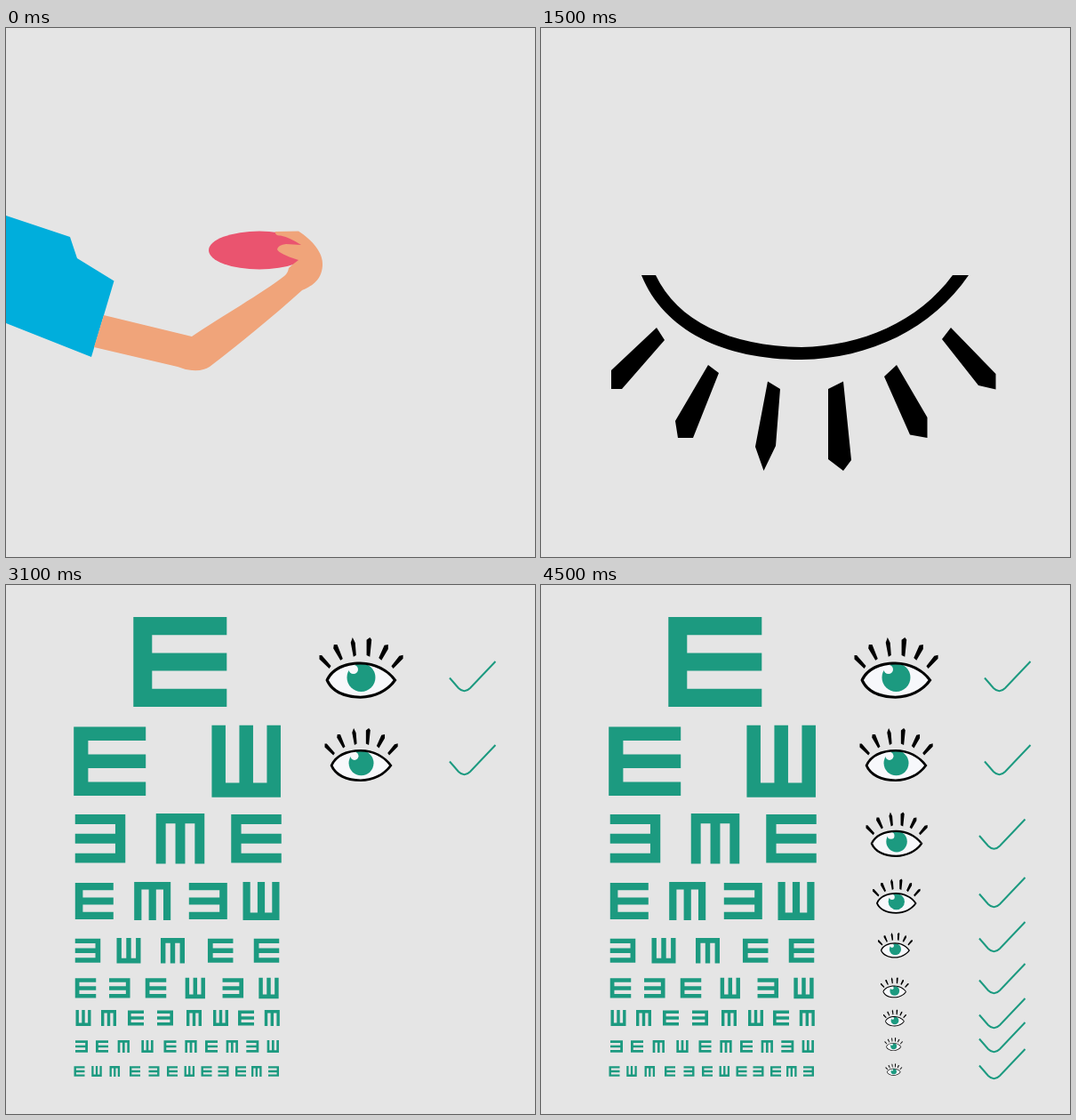
Animation of 595x595 px, one loop 5000 ms. Source, as an HTML page with a canvas:

```html
<!DOCTYPE html>
<html lang="en">
<head>
<meta charset="utf-8">
<title>Eye test</title>
<style>
  html, body { margin: 0; width: 100%; height: 100%; overflow: hidden; background: #e5e5e5; }
  canvas { display: block; }
</style>
</head>
<body>
<canvas id="stage" width="595" height="595"></canvas>
<script>
const ctx = document.getElementById('stage').getContext('2d');
const GREEN = '#1c9a80', BLUE = '#00aedc', SKIN = '#f0a47a', PINK = '#ea546f', WHITE = '#f7f8fb';
const LOOP = 5000;

const fill = (d, color) => {
  ctx.fillStyle = color;
  ctx.fill(new Path2D(d), 'evenodd');
};

const oval = (x, y, rx, ry, color) => {
  ctx.beginPath();
  ctx.ellipse(x, y, rx, ry, 0, 0, 2 * Math.PI);
  ctx.fillStyle = color;
  ctx.fill();
};

function line(d, color, width) {
  ctx.strokeStyle = color;
  ctx.lineWidth = width;
  ctx.stroke(new Path2D(d));
}

function holdDisc() {
  fill('M0 211L72 235L80 259L121.5 284.5L96 370L0 332Z', BLUE);
  oval(285, 250, 57, 21.5, PINK);
  fill('M110 323L209 347C240 326 290 297 313 279Q317 276 318 270Q322 266 329 261' +
    'Q307 254 305 249Q306 244 315 243L332 244Q320 236 309 233.5Q303 234 302.5 229' +
    'L329 228.5C345 239 357 253 356 267C355 285 342 291 333 295C300 325 260 357 229 381' +
    'Q222 386 209 385Q200 384 193 381L99 359Z', SKIN);
}

function throwDisc() {
  fill('M1 219.5L45 235L53 259L95 304L67.5 389.5L2 350L0 285V235Z', BLUE);
  fill('M89 323.5L176 370C220 378 275 388 308 390Q322 391 328 388C343 376 362 370 378 369.5' +
    'Q385 370 385 377Q384 384 377 384.5C368 384 355 384 355 400Q356 406 363 406.5' +
    'C382 408 402 429 408 443Q410 451 402 451Q396 450 378 443Q370 444 353 443' +
    'L316 421C270 414 205 404 176 404.5Q158 407 143 392L77 360Z', SKIN);
  line('M351 343.5C338 335 333 329 333 322C335 300 390 296 460 297.5H517', '#4d4d4d', 1);
}

// Lower half of the eye outline; the upper half is its mirror image.
const RIM = 'M113 278C138 340 205 373 293 373C370 372 440 338 481 278' +
  'H463C425 330 360 358 293 359C212 358 153 329 129 278Z';
const INNER = 'M121 278C146 335 209 365 293 366C365 365 433 334 472 278Z';
const LASHES = 'M130 337L139 351L91 406H79V385Z M188 379L200 388L171 461H154L151 442Z' +
  'M255 397.5L269 406L264 470L250.5 498L241 471Z M323 406L340 397.5L349 486L340 498L323 485Z' +
  'M386 392L400 379L434.5 438V461L415 457.5Z M451 350L461 337L511.5 389V406.5L492 402Z';

function flipped(draw, dx, axis) {
  ctx.save();
  ctx.translate(dx, 2 * axis);
  ctx.scale(1, -1);
  draw();
  ctx.restore();
}

function closedEye() {
  fill(RIM, '#000');
  fill(LASHES, '#000');
}

function openEye() {
  const white = new Path2D(INNER);
  white.addPath(new Path2D(INNER), new DOMMatrix([1, 0, 0, -1, 0, 556]));
  ctx.save();
  ctx.clip(white);
  ctx.fillStyle = WHITE;
  ctx.fillRect(100, 180, 400, 200);
  oval(297, 264, 73.5, 73.5, GREEN);
  oval(257, 222, 24, 24, WHITE);
  ctx.restore();
  fill(RIM, '#000');
  flipped(() => fill(RIM, '#000'), 0, 278);
  flipped(() => fill(LASHES, '#000'), 2, 277.4);
}

// Each chart row: letters, centre y, arm length, height, letter centres.
const ROWS = [
  ['E', 86.5, 105, 101, [195.8]],
  ['EW', 198.3, 81, 77.5, [116.7, 270.2]],
  ['3ME', 285.3, 56.5, 54.5, [106, 196, 281.5]],
  ['EM3W', 355.5, 43, 41, [99.3, 164.7, 227.3, 287]],
  ['3WMEE', 411.2, 28.5, 27, [92, 138, 187.5, 241.2, 293]],
  ['E3EW3W', 453.4, 23.5, 22.3, [89.5, 127.8, 168.5, 212.8, 255.3, 295.5]],
  ['WME3MWEM', 487, 18, 17, [87, 115.5, 146, 179, 211.5, 241.5, 270, 299.3]],
  ['3EMWEMEM3W', 519, 14, 13.3, [85, 108, 132.3, 159, 184.5, 208, 231, 254.3, 277.3, 300.3]],
  ['EWME3EWE3EM3', 547, 12, 11.5,
    [82.5, 102, 122.3, 145, 166.5, 187, 206.3, 225.5, 244.5, 264, 281.8, 301]]
];
const QUARTERS = 'EM3W';

function letter(type, x, y, w, h) {
  ctx.save();
  ctx.translate(x, y);
  ctx.rotate(QUARTERS.indexOf(type) * Math.PI / 2);
  ctx.beginPath();
  ctx.rect(-w / 2, -h / 2, w / 5, h);
  for (const k of [-0.5, -0.1, 0.3]) ctx.rect(-w / 2, k * h, w, h / 5);
  ctx.fillStyle = GREEN;
  ctx.fill();
  ctx.restore();
}

function chart() {
  for (const [letters, y, w, h, xs] of ROWS) {
    xs.forEach((x, i) => letter(letters[i], x, y, w, h));
  }
}

// Small eyes and ticks: eye left, eye top, eye scale, tick left, tick top.
const RESULTS = [
  [352.5, 59, .2175, 499, 86], [358.5, 161, .19, 499, 180], [365.5, 255.5, .16, 493, 263.5],
  [373, 330.5, .124, 493, 329], [379, 391, .09, 493, 379], [382, 441.3, .073, 493, 426],
  [385, 477.5, .06, 493, 465], [386.5, 509, .047, 493, 492], [387.5, 538.3, .043, 493, 522]
];

function smallEye([x, y, s]) {
  ctx.save();
  ctx.translate(x, y);
  ctx.scale(s, s);
  ctx.translate(-81, -57);
  openEye();
  ctx.restore();
}

function tick([, , , x, y]) {
  ctx.save();
  ctx.translate(x, y);
  line('M0 18.5L10 30Q16.5 36.5 23 30L51.5 0', GREEN, 2);
  ctx.restore();
}

function results(t) {
  RESULTS.forEach((row, i) => {
    const tickAt = 2900 + 200 * i;
    if (t >= (i ? tickAt : 2700)) smallEye(row);
    if (t >= tickAt) tick(row);
  });
}

function draw(t) {
  ctx.fillStyle = '#e5e5e5';
  ctx.fillRect(0, 0, 595, 595);
  if (t < 500) holdDisc();
  else if (t < 1000) throwDisc();
  else if (t < 1500) oval(297.5, 298, 114, 43, PINK);
  else if (t < 2000) closedEye();
  else if (t < 2500) openEye();
  else {
    chart();
    results(t);
  }
}

const start = performance.now();
function frame() {
  draw((performance.now() - start) % LOOP);
  requestAnimationFrame(frame);
}
frame();
</script>
</body>
</html>
```
